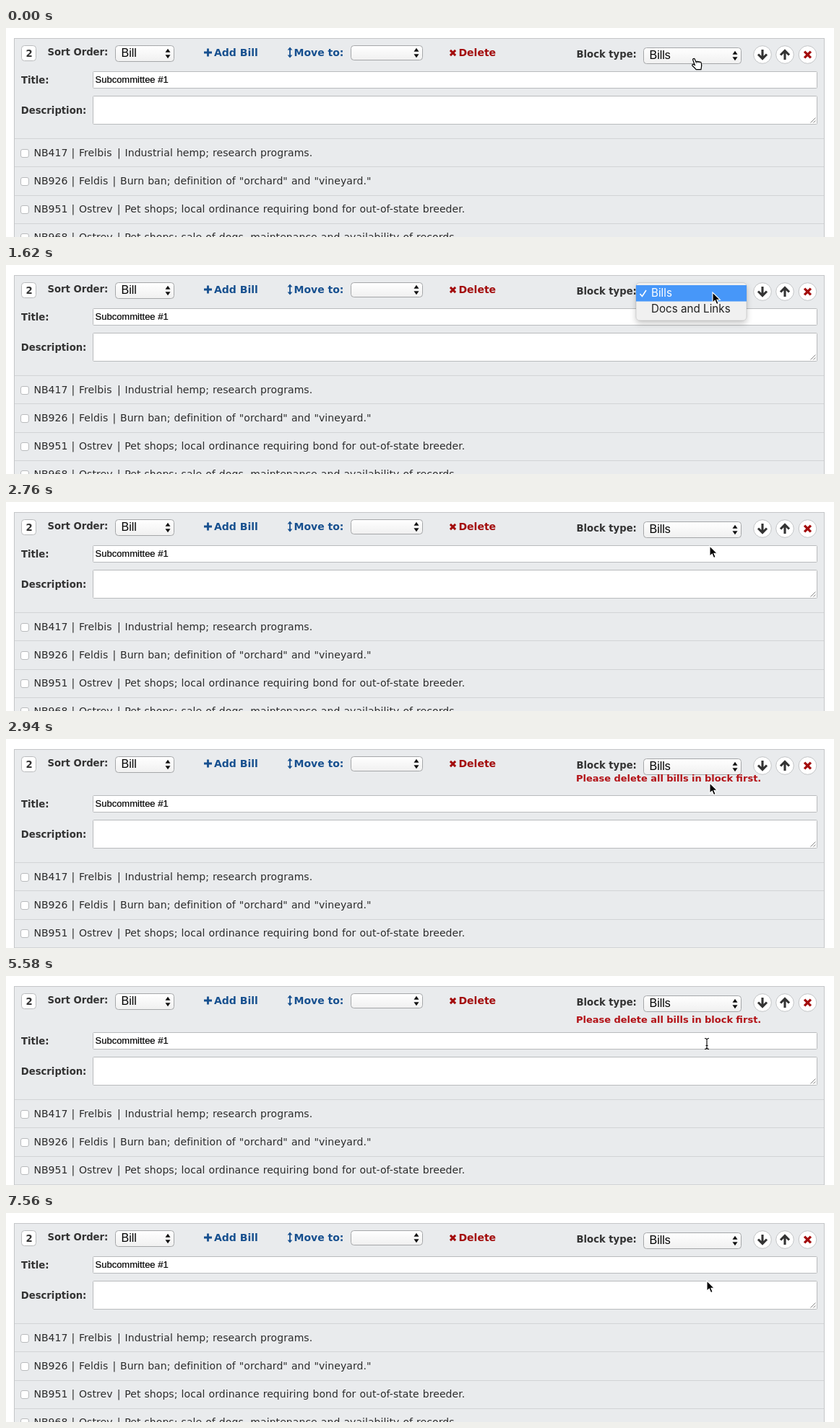
Animation of 1146x290 px, one loop 7.62 s. Source, as an HTML page:

```html
<!DOCTYPE html>
<html lang="en">
<head>
<meta charset="utf-8">
<title>Block type change</title>
<style>
  html, body { margin: 0; width: 100%; height: 100%; overflow: hidden; background: #fff; }
  svg { display: block; width: 1146px; height: 290px; }
  text { white-space: pre; }
  .row { font: 14px "DejaVu Sans", sans-serif; letter-spacing: .07px; word-spacing: .5px; fill: #2b2b2b; }
  .label { font: bold 13.2px "DejaVu Sans", sans-serif; fill: #333; }
  .link { font: bold 14px "DejaVu Sans", sans-serif; }
  .error { font: bold 13px "DejaVu Sans", sans-serif; word-spacing: -.2px; fill: #b31217; }
  .value { font: 16px "Liberation Sans", Arial, sans-serif; fill: #000; }
  .input { font: 13px "Liberation Sans", Arial, sans-serif; fill: #000; stroke: #000; stroke-width: .2px; }
  .item { font: 15.2px Inter, sans-serif; }
  .field { fill: #fff; stroke: #b9bbbd; }
  .select { fill: url(#button); stroke: #a5a7a9; }
</style>
</head>
<body>
<svg id="stage" viewBox="0 0 1146 290" xmlns="http://www.w3.org/2000/svg">
  <defs>
    <linearGradient id="button" x2="0" y2="1">
      <stop offset="0" stop-color="#fff"/><stop offset="1" stop-color="#f0f0f0"/>
    </linearGradient>
    <filter id="shadow" x="-15%" y="-30%" width="130%" height="180%">
      <feDropShadow dx="0" dy="4" stdDeviation="4" flood-opacity=".22"/>
    </filter>
  </defs>
  <rect x="11.5" y="14.5" width="1121" height="300" fill="#e9ebed" stroke="#c4c6c8"/>
  <g id="body"></g>
  <g id="toolbar"></g>
  <text id="error" class="error" x="789">Please delete all bills in block first.</text>
  <g id="menu">
    <rect x="872" y="24.5" width="153" height="52.5" rx="5" fill="#f0f0f0" filter="url(#shadow)"/>
    <rect x="872" y="24.5" width="153" height="52.5" rx="5" fill="none" stroke="#000" stroke-opacity=".12"/>
    <rect id="active" x="872" width="153" height="22.5" fill="#4797f9"/>
    <path id="check" d="M877.5 40l3 3.5 5.5-8.500" fill="none" stroke-width="1.6"/>
    <text class="item" x="893" y="44">Bills</text>
    <text class="item" x="893" y="66">Docs and Links</text>
  </g>
  <circle id="ring" r="20" fill="none" stroke="#000" stroke-width="3"/>
  <g id="cursor">
    <path id="arrow" d="M0 0v14.2l3.3-3 2.3 5.4 2.6-1.1-2.3-5.2h4.5z" fill="#000" stroke="#fff" stroke-width="1.1"/>
    <path id="hand" d="M-2.300 1.200c-.5-1.700 2-2.400 2.700-.8l1.800 4c.2-1.200 2-1.400 2.500-.1.400-1 2-.9 2.400.3.700-.7 1.900-.4 2.100.8.500 2 .9 3.600.3 5.400l-.6 3.800h-6.700c-1.500-1.900-3-3.200-4.800-4.800-1.400-1.200-.4-2.900 1.300-2.200l1.600.9z" fill="#fff" stroke="#000" stroke-width="1.2"/>
    <g id="beam" fill="none">
      <path d="M-3-7.5q3 0 3 2v11q0 2 3 2M3-7.5q-3 0-3 2v11q0 2-3 2M-1.5 2.5h3" stroke="#fff" stroke-width="2.4" opacity=".7"/>
      <path d="M-3-7.5q3 0 3 2v11q0 2 3 2M3-7.5q-3 0-3 2v11q0 2-3 2M-1.5 2.5h3" stroke="#000" stroke-width="1.1"/>
    </g>
  </g>
</svg>
<script>
const LOOP = 7620;
const BLUE = '#17508f', RED = '#a30c0c', INK = '#333';
const $ = id => document.getElementById(id);

const text = (cls, x, y, str, fill) =>
  `<text class="${cls}" x="${x}" y="${y}"${fill ? ` style="fill:${fill}"` : ''}>${str}</text>`;
const box = (x, y, w, h, r = 0, cls = 'field') =>
  `<rect class="${cls}" x="${x + .5}" y="${y + .5}" width="${w - 1}" height="${h - 1}" rx="${r}"/>`;
const line = (d, color, width) =>
  `<path d="${d}" fill="none" stroke="${color}" stroke-width="${width}"/>`;

function select(x, y, w, h, value) {
  const ax = x + w - 9, ay = y + h / 2;
  return box(x, y, w, h, 4, 'select') +
    `<path d="M${ax - 3.5} ${ay - 1.7}l3.5-5 3.5 5zM${ax - 3.5} ${ay + 1.7}l3.5 5 3.5-5z" fill="#111"/>` +
    text('value', x + 8.5, y + 16, value);
}

function roundButton(x, icon) {
  return `<circle cx="${x}" cy="37" r="12.3" fill="#fff" stroke="#c3c5c7"/>` +
    `<g transform="translate(${x} 37)">${icon}</g>`;
}

const cross = (r, w) => line(`M${-r} ${-r}L${r} ${r}M${r} ${-r}L${-r} ${r}`, RED, w);

$('toolbar').innerHTML =
  box(21, 24, 21, 22, 4) + text('label', 27.4, 40, '2') +
  text('label', 57.5, 38, 'Sort Order:') + select(151, 24, 82, 23, 'Bill') +
  line('M274 34h11M279.5 28.5v11', BLUE, 2.8) + text('link', 288, 39, 'Add Bill', BLUE) +
  line('M393 29v10', BLUE, 1.8) +
  `<path d="M389.6 30.5l3.4-4 3.4 4zM389.6 37.5l3.4 4 3.4-4z" fill="${BLUE}"/>` +
  text('link', 398.5, 39, 'Move to:', BLUE) + select(477, 24, 100, 21, '') +
  `<g transform="translate(618.5 34.5)">${cross(3.6, 2.9)}</g>` +
  text('link', 626.5, 39, 'Delete', RED) +
  text('label', 789.5, 41, 'Block type:') + select(882, 27, 136, 23, 'Bills') +
  roundButton(1047, line('M0-7v12.5M-6-.5l6 6 6-6', INK, 3.1)) +
  roundButton(1078, line('M0 7v-12.5M-6 .5l6-6 6 6', INK, 3.1)) +
  roundButton(1109.5, cross(4.4, 3.4));

// Each row: number, member, start of the title, title
const bills = [
  ['NB417', 'Frelbis', 164.5, 'Industrial hemp; research programs.'],
  ['NB926', 'Feldis', 158, 'Burn ban; definition of "orchard" and "vineyard."'],
  ['NB951', 'Ostrev', 164.2, 'Pet shops; local ordinance requiring bond for out-of-state breeder.'],
  ['NB968', 'Ostrev', 164.2, 'Pet shops; sale of dogs, maintenance and availability of records.']
];

function billRow([number, member, x, title], i) {
  const y = Math.round(153 + 39.3 * i), base = 178 + 39 * i;
  return line(`M12 ${y + .5}H1132`, '#d2d4d6', 1) + box(20, base - 10, 12, 12, 2.5) +
    text('row', 38.4, base, number) + text('row', 90.6, base, '|') +
    text('row', 101, base, member) + text('row', x - 10.4, base, '|') +
    text('row', x, base, title);
}

$('body').innerHTML =
  text('label', 21, 77, 'Title:') + box(120, 60, 1003, 24, 1) + text('input', 123.5, 76, 'Subcommittee #1') +
  text('label', 20.8, 119, 'Description:') + box(120, 94, 1003, 40, 1) +
  line('M1113.5 131.5l7-7M1117.5 131.5l3-3', '#888', 1) +
  bills.map(billRow).join('');

// Pointer stops: time, x, y
const path = [
  [0, 953, 43], [300, 953, 43], [800, 974, 38.5], [1200, 974, 38.5], [1560, 978, 38],
  [1680, 978, 38], [2220, 974, 61], [3180, 974, 61], [3840, 970, 95],
  [4980, 970, 95], [5040, 970, 94], [LOOP, 970, 94]
];
const clamp = v => Math.max(0, Math.min(1, v));
const ease = v => v * v * (3 - 2 * v);
const within = (t, a, b) => t >= a && t < b;
const show = (id, on) => { $(id).style.display = on ? '' : 'none'; };

function pointer(t) {
  const i = path.findIndex(p => p[0] > t);
  const [t0, x0, y0] = path[i - 1], [t1, x1, y1] = path[i];
  const k = ease((t - t0) / (t1 - t0));
  return [x0 + (x1 - x0) * k, y0 + (y1 - y0) * k];
}

function draw(t) {
  const [x, y] = pointer(t);
  const pushed = within(t, 2820, 7320);

  $('body').setAttribute('transform', `translate(0 ${pushed ? 18 : 0})`);
  show('error', pushed);
  const slide = clamp((t - 2820) / 240) - clamp((t - 7080) / 240);
  $('error').setAttribute('y', 53 + 12 * slide);

  show('menu', within(t, 1140, 2760));
  $('menu').style.opacity = 1 - clamp((t - 2640) / 120);
  const second = y >= 51;
  $('active').setAttribute('y', second ? 50.5 : 28);
  $('check').setAttribute('stroke', second ? '#222' : '#fff');
  document.querySelectorAll('.item').forEach((item, i) => {
    item.style.fill = (i === 1) === second ? '#fff' : '#222';
  });

  show('ring', within(t, 840, 1140) || within(t, 2340, 2640));
  $('ring').setAttribute('transform', `translate(${x} ${y + .8})`);

  const hand = t < 1140, beam = pushed && y >= 78;
  show('hand', hand);
  show('beam', beam);
  show('arrow', !hand && !beam);
  $('cursor').setAttribute('transform', `translate(${x} ${y})`);
}

const start = performance.now();
function tick() {
  draw((performance.now() - start) % LOOP);
  requestAnimationFrame(tick);
}
draw(0);
requestAnimationFrame(tick);
</script>
</body>
</html>
```
